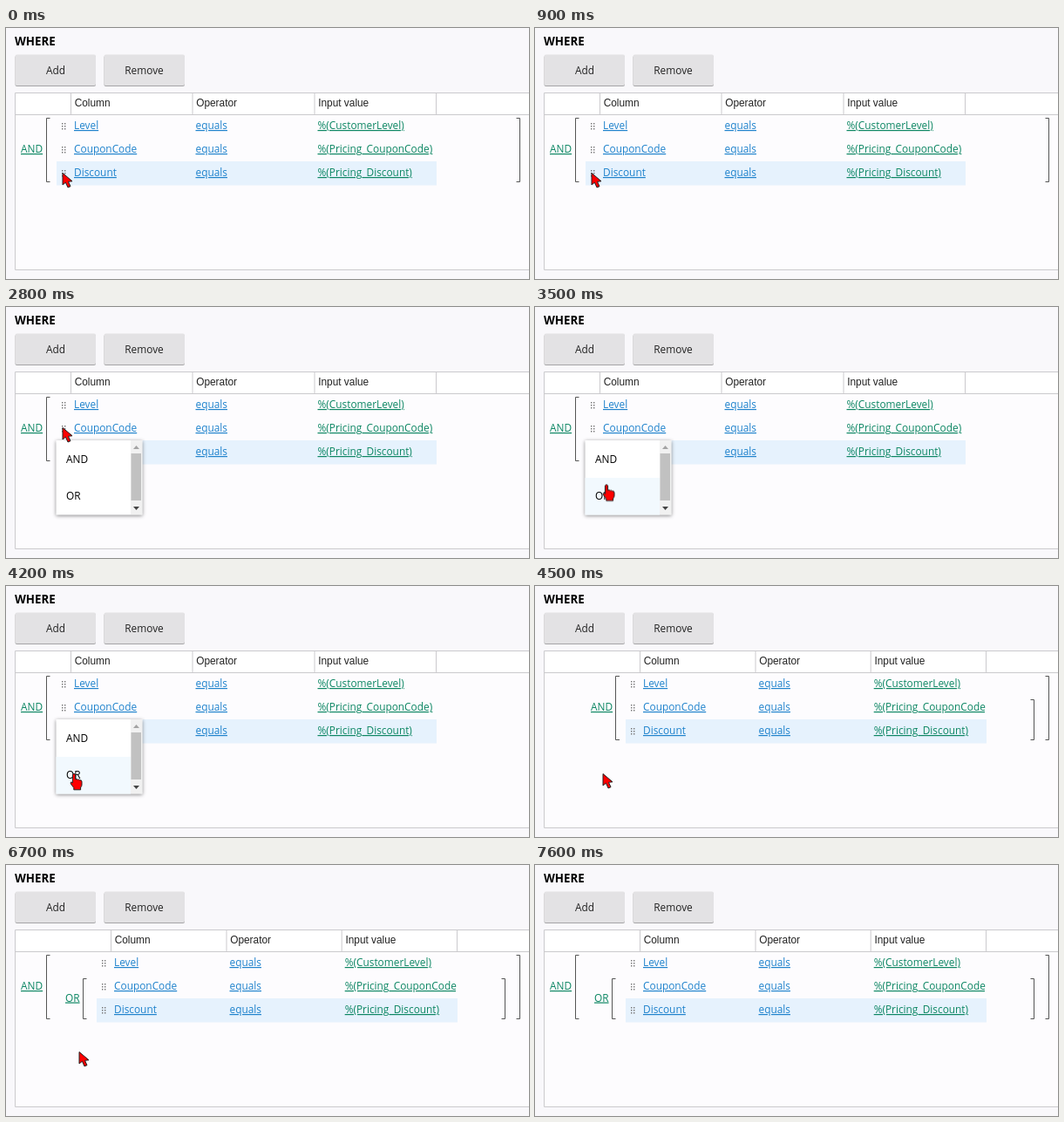
Animation of 600 by 288 pixels, one loop 7700 ms. Source, as an HTML page:

```html
<!DOCTYPE html>
<html lang="en">
<head>
<meta charset="utf-8">
<title>Condition builder</title>
<style>
html, body { margin: 0; width: 100%; height: 100%; overflow: hidden; background: #f9f8fb; }
svg { display: block; width: 600px; height: 288px; font: 11.87px "Open Sans", sans-serif; }
.title { font-size: 13.3px; font-weight: 700; }
.button { fill: #e3e2e4; filter: drop-shadow(0 1px .6px #0005); }
.mid { text-anchor: middle; fill: #222; }
.line { fill: none; stroke: #cbcacd; }
.head { font-family: "Liberation Sans", Arial, sans-serif; fill: #222; }
.link { fill: #1e82cc; text-decoration: underline; }
.value { fill: #0c8663; text-decoration: underline; }
#after .value { clip-path: url(#edge); }
.picked { fill: #e6f2fd; }
.bracket { fill: none; stroke: #555; }
.dots { fill: #777; }
.menu { fill: #fff; filter: drop-shadow(0 1px 2px #0007); }
.hover { fill: #f2f9fe; }
.red { fill: #f00; stroke: #222; stroke-linejoin: round; }

.anim { animation: 7.7s step-end infinite; }
#before { animation-name: before; }
#after { animation-name: after; }
#solo { animation-name: solo; }
#nested { animation-name: nested; }
#outer { animation-name: outer; }
#menu { animation-name: menu; }
#drop { animation-name: drop; fill: #eef6fe; }
#hoverAnd { animation-name: hover-and; }
#hoverOr { animation-name: hover-or; }
#arrow { animation-name: arrow; }
#drag { animation-name: drag; }
#hand { animation-name: hand; }
#cursor { animation: move 7.7s linear infinite; }

@keyframes before { 0% { visibility: visible } 55.84%, 100% { visibility: hidden } }
@keyframes after { 0% { visibility: hidden } 55.84%, 100% { visibility: visible } }
@keyframes solo { 0%, 61.04%, 100% { visibility: hidden } 55.84% { visibility: visible } }
@keyframes nested { 0% { visibility: hidden } 61.04%, 100% { visibility: visible } }
@keyframes outer { 0%, 55.84%, 100% { visibility: visible } 27.27% { visibility: hidden } }
@keyframes menu { 0%, 55.84%, 100% { visibility: hidden } 27.27% { visibility: visible } }
@keyframes drop { 0%, 24.68%, 100% { visibility: hidden } 16.23% { visibility: visible } }
@keyframes hover-and { 0%, 42.21%, 100% { visibility: hidden } 38.96% { visibility: visible } }
@keyframes hover-or { 0%, 55.84%, 100% { visibility: hidden } 42.21% { visibility: visible } }
@keyframes arrow {
  0%, 24.68%, 55.84% { visibility: visible }
  14.94%, 38.96%, 90.91%, 100% { visibility: hidden }
}
@keyframes drag { 0%, 24.68%, 100% { visibility: hidden } 14.94% { visibility: visible } }
@keyframes hand { 0%, 55.84%, 100% { visibility: hidden } 38.96% { visibility: visible } }
@keyframes move {
  0%, 12.99% { transform: translate(65px, 166px) }
  19.48%, 24.6% { transform: translate(66px, 139px) }
  24.68% { transform: translate(65px, 138px) }
  37.01% { transform: translate(65px, 138px); animation-timing-function: ease-in-out }
  42.86% { transform: translate(82px, 203.5px) }
  46.1% { transform: translate(82px, 203.5px); animation-timing-function: ease-in-out }
  51.3%, 61.04% { transform: translate(78px, 215px) }
  64.94%, 100% { transform: translate(84px, 214px) }
}
</style>
</head>
<body>
<svg viewBox="0 0 600 288">
  <defs>
    <path id="grip" class="dots" d="M-2-4h1.400v1.400h-1.400zm3 0h1.400v1.400h-1.400zm-3 3h1.400v1.400h-1.400zm3 0h1.400v1.400h-1.400zm-3 3h1.400v1.400h-1.400zm3 0h1.400v1.400h-1.400z"/>
    <clipPath id="edge"><path d="M0 0H516.800V288H0z"/></clipPath>
  </defs>

  <text class="title" x="10" y="20.400">WHERE</text>
  <rect class="button" x="10.500" y="30.500" width="92.500" height="35.500" rx="2"/>
  <rect class="button" x="112.500" y="30.500" width="92.500" height="35.500" rx="2"/>
  <text class="mid" x="57" y="53">Add</text>
  <text class="mid" x="158.500" y="53">Remove</text>

  <path fill="#fdfcfe" d="M10.500 74.500H602V277.500H10.500z"/>
  <path fill="#fff" d="M10.500 74.500H602V99.500H10.500z"/>
  <path class="line" d="M602 74.500H10.500V277.500H602M10.500 99.500H602"/>

  <g id="before" class="anim">
    <text class="value" x="17" y="143">AND</text>
    <path class="bracket" d="M50.500 103.500H46.500V176.500H50.500"/>
  </g>
  <path id="drop" class="anim" d="M58 126H76V153H58z"/>
  <use href="#grip" class="anim" style="animation-name: drop" x="66" y="139"/>

  <g id="after" class="anim"></g>
  <g id="solo" class="anim">
    <text class="value" x="64" y="143">AND</text>
    <path class="bracket" d="M97 103.500H92.500V176.500H97"/>
    <path class="bracket" d="M568.500 130.500H572.500V176.500H568.500"/>
  </g>
  <g id="nested" class="anim">
    <text class="value" x="17" y="143">AND</text>
    <path class="bracket" d="M50.500 103.500H46.500V176.500H50.500"/>
    <text class="value" x="68" y="156.500">OR</text>
    <path class="bracket" d="M92.500 130.500H88.500V176.500H92.500"/>
    <path class="bracket" d="M568.500 130.500H572.500V176.500H568.500"/>
  </g>
  <path id="outer" class="anim bracket" d="M585.500 103.500H589.500V176.500H585.500"/>

  <g id="menu" class="anim">
    <path class="menu" d="M57.500 153H156.500V238.500H57.500z"/>
    <path id="hoverAnd" class="anim hover" d="M57.500 153H143V196H57.500z"/>
    <path id="hoverOr" class="anim hover" d="M57.500 196H143V238.500H57.500z"/>
    <text x="69" y="179">AND</text>
    <text x="69" y="221">OR</text>
    <path fill="#f1f1f1" d="M143 153H156V238H143z"/>
    <path fill="#c1c1c1" d="M143.500 168H155V222H143.500z"/>
    <path fill="#a3a3a3" d="M146 163l3.500-4 3.500 4z"/>
    <path fill="#444" d="M146 229l3.500 4 3.500-4z"/>
  </g>

  <g id="cursor">
    <path id="arrow" class="anim red" d="M0 .5V14L3.400 11.200 6 17 9 15.700 6.500 10.300 11 9.800z"/>
    <g id="drag" class="anim">
      <path fill="none" stroke="#111" stroke-dasharray="1.500 1" d="M3.500 14.500H11.500V21.500H3.500z"/>
      <path fill="#fff" stroke="#111" d="M0 .5V15.500L3.600 12.300 6 17.700 8.700 16.500 6.400 11.300H11z"/>
      <path fill="#fff" stroke="#111" d="M9.500 18.500H15.500V24.500H9.500zM12.500 19.500V23.500M10.500 21.500H14.500"/>
    </g>
    <path id="hand" class="anim red" d="M-1.600 1.400Q0-.8 1.600 1.400V6.800Q3 5.800 4.200 7.200 5.600 6.400 6.600 7.800 8.800 7.200 9 9.400V13Q9 15 7.600 16V18.800H-.2V16.600L-3.600 12Q-4.600 10.200-3 9.800L-1.600 11z"/>
  </g>
</svg>
<script>
const HEADS = ["Column", "Operator", "Input value"];
const ROWS = [
  ["Level", "equals", "%(CustomerLevel)"],
  ["CouponCode", "equals", "%(Pricing_CouponCode)"],
  ["Discount", "equals", "%(Pricing_Discount)"]
];

const text = (cls, x, y, s) => `<text class="${cls}" x="${x}" y="${y}">${s}</text>`;

// cols: the three column starts and the right edge
function table(id, cols) {
  const left = cols[0] - 16;
  let out = `<rect class="picked" x="${left}" y="153" width="${cols[3] + 1 - left}" height="27.5"/>`;
  cols.forEach(x => out += `<path class="line" d="M${x + 0.5} 75V99"/>`);
  HEADS.forEach((s, i) => out += text("head", cols[i] + 4.7, 90, s));
  ROWS.forEach((row, r) => {
    row.forEach((s, i) =>
      out += text(i < 2 ? "link" : "value", cols[i] + 4, 116 + 27 * r, s));
    out += `<use href="#grip" x="${cols[0] - 8}" y="${113 + 27 * r}"/>`;
  });
  document.getElementById(id).insertAdjacentHTML("beforeend", out);
}

table("before", [74, 213.5, 353.5, 493]);
table("after", [120, 252.5, 384.7, 517]);
</script>
</body>
</html>
```
